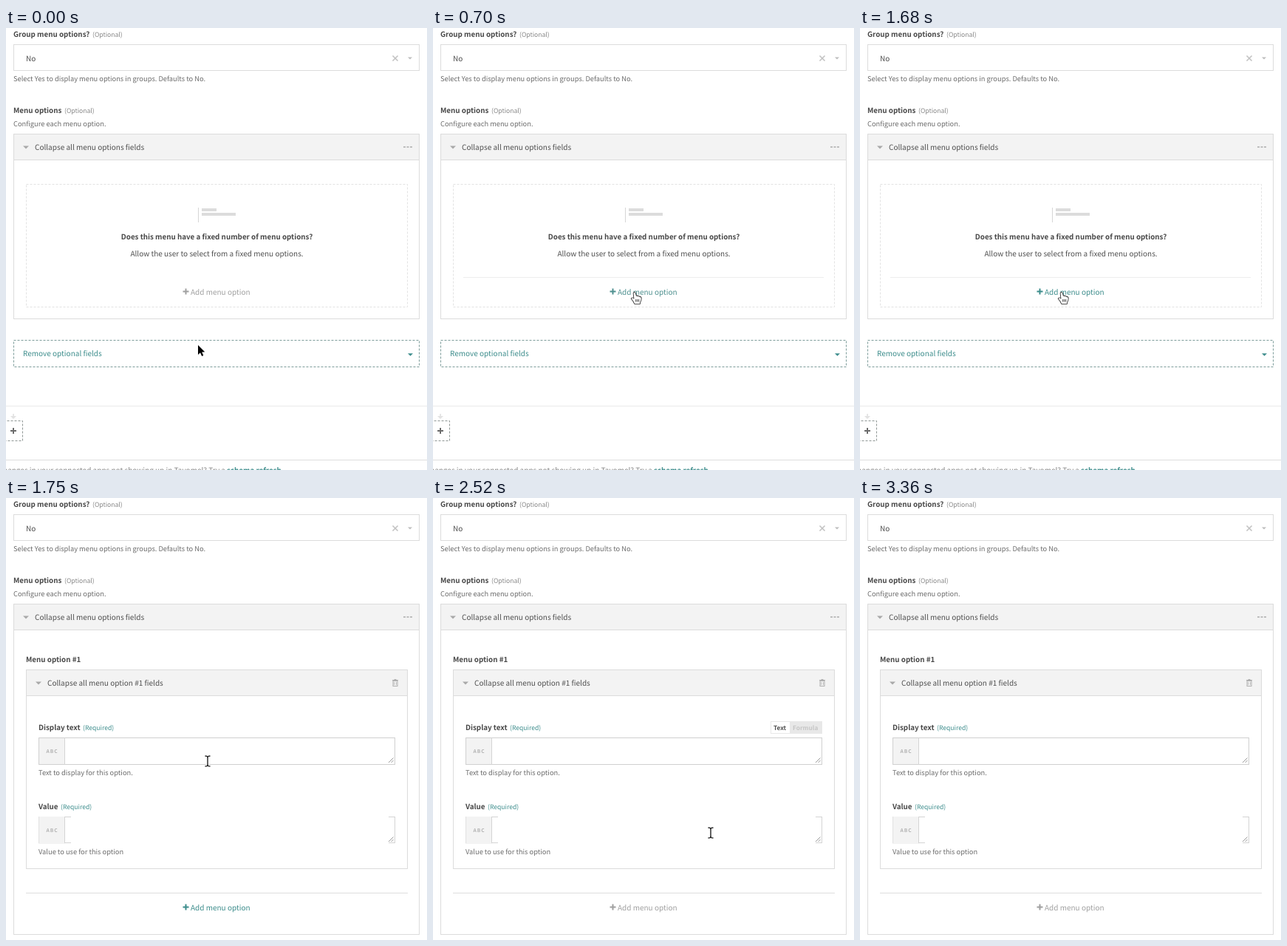
Write an HTML page with a canvas that moves like this. It is 570 px wide and 598 px high and loops after 3.43 s.

```html
<!DOCTYPE html>
<html lang="en">
<head>
<meta charset="utf-8">
<title>Menu options form</title>
<style>
html, body { margin: 0; width: 100%; height: 100%; overflow: hidden; background: #fff; }
canvas { display: block; }
</style>
</head>
<body>
<canvas id="stage" width="570" height="598"></canvas>
<script>
const ctx = document.getElementById('stage').getContext('2d');
const LOOP = 3430, STEP = 70, ADDED = 1750;
const FAMILY = '"Noto Sans CJK JP", "Noto Sans CJK SC", "Noto Sans CJK KR", "Noto Sans CJK TC", "Noto Sans CJK", "Noto Sans", sans-serif';
const INK = '#505050', SOFT = '#6b6b6b', TEAL = '#3d8d8c', EDGE = '#dcdcdc', HEAD = '#f3f3f3';
const GREY = [160, 160, 160], ACCENT = [61, 141, 140];

const clamp = v => Math.min(1, Math.max(0, v));
const span = (t, a, b) => clamp((t - a) / (b - a));
const ease = p => p * p * (3 - 2 * p);
const blend = (a, b, p) => `rgb(${a.map((v, i) => Math.round(v + (b[i] - v) * p))})`;

function text(str, x, y, { size = 10, bold = false, color = INK, align = 'left', gap = 0 } = {}) {
  ctx.font = `${bold ? 600 : 400} ${size}px ${FAMILY}`;
  ctx.textRendering = 'geometricPrecision';
  ctx.letterSpacing = gap + 'px';
  ctx.textAlign = align;
  ctx.fillStyle = color;
  ctx.fillText(str, x, y);
}

const label = (str, x, y) => text(str, x, y, { size: 9.8, bold: true, color: '#484848' });
const note = (str, x, y) => text(str, x, y, { size: 9.3, color: SOFT });
const tag = (str, x, y, color) => text(str, x, y, { size: 8.6, color });

function rect(x, y, w, h, color) {
  ctx.fillStyle = color;
  ctx.fillRect(x, y, w, h);
}

function frame(x, y, w, h, color = EDGE, dash = []) {
  ctx.setLineDash(dash);
  ctx.lineWidth = 1;
  ctx.strokeStyle = color;
  ctx.strokeRect(x + 0.5, y + 0.5, w - 1, h - 1);
  ctx.setLineDash([]);
}

function line(points, color, width = 1) {
  ctx.beginPath();
  points.forEach(([x, y]) => ctx.lineTo(x, y));
  ctx.strokeStyle = color;
  ctx.lineWidth = width;
  ctx.stroke();
}

function poly(points, fill) {
  ctx.beginPath();
  points.forEach(([x, y]) => ctx.lineTo(x, y));
  ctx.closePath();
  ctx.fillStyle = fill;
  ctx.fill();
}

const caret = (x, y, r, color) => poly([[x - r, y - r / 2], [x + r, y - r / 2], [x, y + r / 2]], color);

function plus(x, y, r, color) {
  rect(x - r, y - 1, 2 * r, 2, color);
  rect(x - 1, y - r, 2, 2 * r, color);
}

function header(x, y, w, str) {
  rect(x, y, w, 36, HEAD);
  frame(x, y, w, 36);
  caret(x + 17, y + 18.5, 4, '#a9a9a9');
  text(str, x + 29, y + 22);
}

function addLink(y, color) {
  plus(243.5, y - 0.5, 4, color);
  text('Add menu option', 250, y + 4, { color });
}

function drawTop(bottom) {
  label('Group menu options?', 10, 12);
  tag('(Optional)', 117, 12, '#858585');
  frame(10, 22, 550, 36);
  text('No', 27, 44.5);
  line([[523.5, 37.5], [530.5, 44.5]], '#c2c2c2', 1.6);
  line([[530.5, 37.5], [523.5, 44.5]], '#c2c2c2', 1.6);
  caret(547, 41, 3, '#bdbdbd');
  note('Select Yes to display menu options in groups. Defaults to No.', 10, 72);
  label('Menu options', 10, 115);
  tag('(Optional)', 79, 115, '#858585');
  note('Configure each menu option.', 10, 133);
  frame(10, 143, 550, bottom - 143);
  header(10, 143, 550, 'Collapse all menu options fields');
  for (let i = 0; i < 3; i++) rect(538 + i * 4.5, 160, 3, 2, '#bebebe');
}

function drawEmpty(t) {
  frame(27, 211, 517, 167, '#e2e2e2', [3, 2]);
  rect(260, 243, 1, 20, '#d6d6d6');
  rect(265, 244, 20, 4, '#dcdcdc');
  rect(265, 250, 46, 4, '#dcdcdc');
  text('Does this menu have a fixed number of menu options?', 285.5, 286, { size: 9.8, bold: true, align: 'center', color: '#484848' });
  text('Allow the user to select from a fixed menu options.', 285.5, 309, { align: 'center' });
  if (t >= STEP) rect(41, 337, 488, 1, '#ededed');
  addLink(357, blend(GREY, ACCENT, span(t, 350, 770)));

  frame(10, 422, 550, 37, '#7d9c9a', [3, 2]);
  text('Remove optional fields', 23, 444, { color: TEAL });
  caret(547.5, 442, 3.5, TEAL);

  rect(0, 511, 570, 1, '#e9e9e9');
  rect(9, 522, 2, 4, '#e6e6e6');
  caret(10, 527, 4, '#e2e2e2');
  frame(-14, 531, 37, 28, '#8f9795', [3, 2]);
  plus(10, 545, 4, '#6c6c6c');
  rect(0, 584, 570, 1, '#dedede');
  text('Changes in your connected apps not showing up in Tavomel? Try a', 297, 602, { color: '#858585', align: 'right' });
  text('schema refresh', 299, 602, { size: 9.8, bold: true, color: TEAL });
}

function field(name, tagX, y, hint, open) {
  label(name, 44, y - 10);
  tag('(Required)', tagX, y - 10, TEAL);
  rect(44, y, 36, 37, HEAD);
  if (open) {
    rect(79, y, 1, 36, '#d4d4d4');
    for (const by of [y, y + 35]) {
      rect(80, by, 8, 1, '#d4d4d4');
      rect(518, by, 9, 1, '#d4d4d4');
    }
    rect(526, y, 1, 36, '#d4d4d4');
    rect(44, y, 1, 36, '#e2e2e2');
  } else {
    frame(44, y, 483, 37, '#d0d0d0');
    rect(79, y, 1, 37, '#d4d4d4');
  }
  text('ABC', 54.5, y + 21, { size: 6.6, bold: true, color: '#b2b2b2', gap: 1 });
  line([[518, y + 34], [524.5, y + 27.5]], '#999');
  line([[521.5, y + 34], [524.5, y + 31]], '#999');
  note(hint, 44, y + 50.5);
}

function toggle(y) {
  rect(457, y, 70, 17, '#e8e8e8');
  rect(458, y + 1, 25, 15, '#fff');
  text('Text', 461, y + 11.5, { size: 8.3, bold: true });
  text('Formula', 487, y + 11.5, { size: 8.3, bold: true, color: '#c6c6c6' });
}

function trash(x, y) {
  const c = '#b0b0b0';
  rect(x - 4, y - 4, 8, 1, c);
  rect(x - 1.5, y - 5, 3, 1, c);
  ctx.strokeStyle = c;
  ctx.lineWidth = 1;
  ctx.strokeRect(x - 3, y - 2.5, 6, 7);
  for (const dx of [-1.3, 1.3]) rect(x + dx - 0.4, y - 1, 0.8, 4, c);
}

function drawOption(t) {
  label('Menu option #1', 27, 222);
  frame(27, 232, 517, 270);
  header(27, 232, 517, 'Collapse all menu option #1 fields');
  trash(527, 250);
  field('Display text', 104, 324, 'Text to display for this option.', false);
  field('Value', 74, 431, 'Value to use for this option', true);
  if (t >= 1820 && t < 2590) toggle(302);
  if (t >= 2590 && t < 2870) toggle(408);
  rect(27, 534, 517, 1, '#dedede');
  addLink(554, blend(ACCENT, GREY, span(t, 1820, 2100)));
}

function outlined(x, y, build, fill, stroke, width) {
  ctx.save();
  ctx.translate(x, y);
  ctx.beginPath();
  build();
  ctx.closePath();
  ctx.lineJoin = 'round';
  ctx.lineWidth = width;
  ctx.strokeStyle = stroke;
  ctx.fillStyle = fill;
  ctx.stroke();
  ctx.fill();
  ctx.restore();
}

function arrow(x, y) {
  const tip = [[0, 0], [0, 13], [3, 10.3], [5.2, 15], [7.3, 14], [5.2, 9.6], [9.2, 9.3]];
  outlined(x, y, () => tip.forEach(p => ctx.lineTo(...p)), '#000', '#fff', 1.6);
}

function hand(x, y) {
  outlined(x, y, () => {
    ctx.moveTo(-3.5, -6);
    ctx.quadraticCurveTo(-2.5, -9, -1, -6);
    ctx.lineTo(0, -2.2);
    ctx.quadraticCurveTo(1.4, -3.2, 2.3, -1.8);
    ctx.quadraticCurveTo(4, -2.6, 4.6, -1);
    ctx.quadraticCurveTo(6.8, -1.6, 6.8, 1);
    ctx.quadraticCurveTo(6.8, 4, 5.2, 6);
    ctx.lineTo(5.2, 8);
    ctx.lineTo(-2, 8);
    ctx.quadraticCurveTo(-3, 5, -6.3, 1.2);
    ctx.quadraticCurveTo(-5.8, -1, -2.6, 1.6);
  }, '#fff', '#222', 1.6);
  for (const dx of [0, 2, 4]) line([[x + dx - 0.3, y + 2], [x + dx - 0.3, y + 5.5]], '#333', 0.9);
}

function beam(x, y) {
  for (const [color, w] of [['#fff', 3], ['#222', 1.4]]) {
    line([[x, y - 6], [x, y + 6]], color, w);
    for (const s of [-1, 1]) line([[x - 3.5, y + 7 * s], [x - 1, y + 6.6 * s], [x, y + 5.5 * s], [x + 1, y + 6.6 * s], [x + 3.5, y + 7 * s]], color, w);
  }
}

// time, x, y
const PATH = [[0, 260, 429], [350, 261, 358], [700, 274, 364], [1680, 274, 364],
  [1750, 273, 356], [1890, 273, 356], [2520, 376, 453], [2660, 380, 458], [3220, 392, 616]];

function pointer(t) {
  const i = PATH.findIndex(p => p[0] > t);
  if (i < 0) return;
  const [t0, x0, y0] = PATH[i - 1], [t1, x1, y1] = PATH[i];
  const p = ease(span(t, t0, t1));
  const x = x0 + (x1 - x0) * p, y = y0 + (y1 - y0) * p;
  if (t < ADDED) return t <= 350 ? arrow(x, y) : hand(x + 1, y + 1);
  const inField = (y > 324 && y < 362) || (y > 430 && y < 468);
  (inField ? beam : arrow)(x, y);
}

function draw(now) {
  const t = Math.floor((now % LOOP) / STEP) * STEP;
  const added = t >= ADDED;
  rect(0, 0, 570, 598, '#fff');
  drawTop(added ? 591 : 394);
  (added ? drawOption : drawEmpty)(t);
  pointer(t);
}

const start = performance.now();
function tick() {
  draw(performance.now() - start);
  requestAnimationFrame(tick);
}
tick();
</script>
</body>
</html>
```
